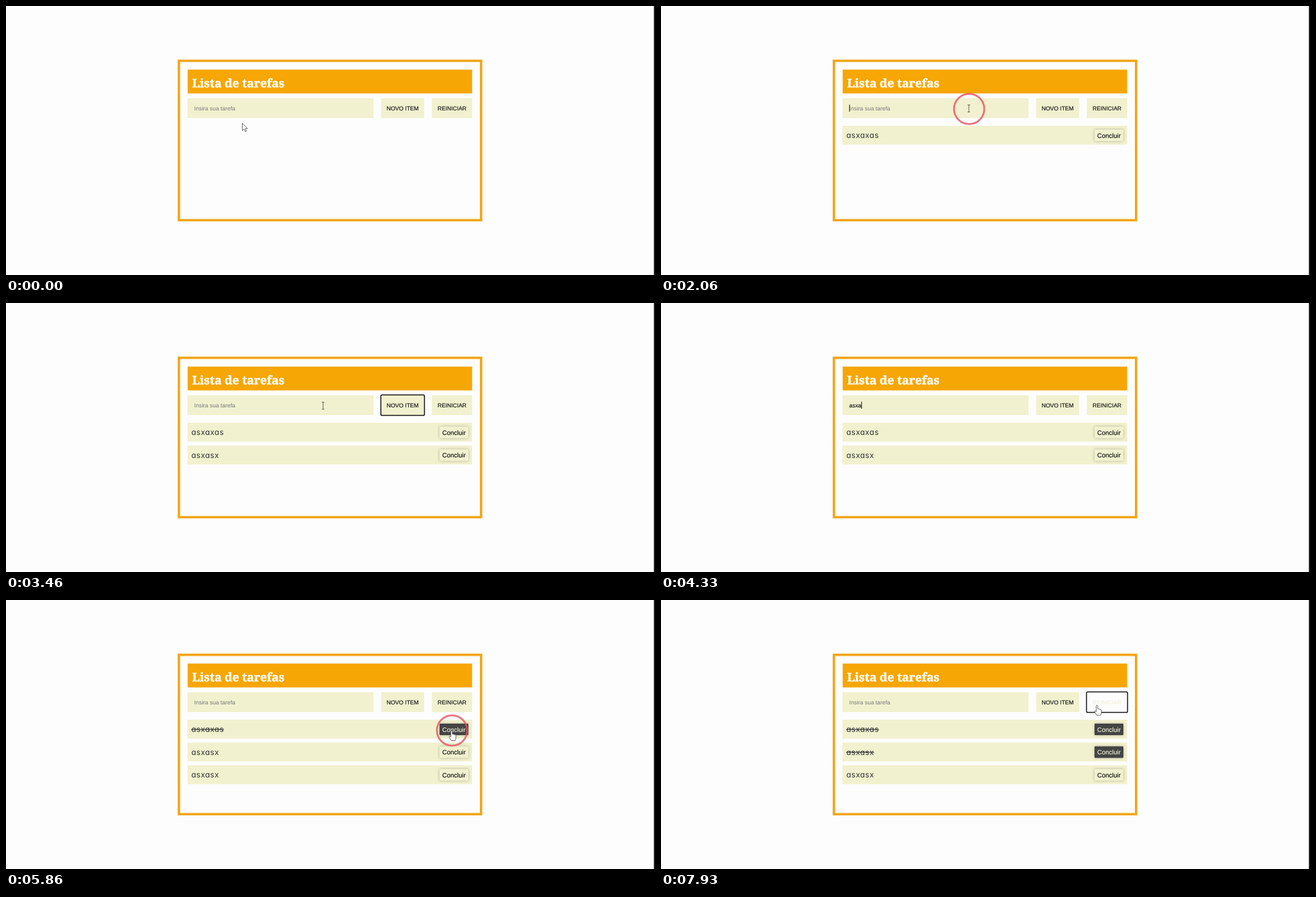
Recreate the animation shown at these times as an HTML page. Size 1012 by 420 pixels, loop 8000 ms.

```html
<!DOCTYPE html>
<html lang="pt">
<head>
<meta charset="utf-8">
<title>Lista de tarefas</title>
<style>
html, body { margin: 0; width: 100%; height: 100%; overflow: hidden; background: #fdfdfd; }
svg { display: block; }
text { font: 8.92px "Liberation Sans", Arial, sans-serif; fill: #111; stroke: #111; stroke-width: .15; text-rendering: geometricPrecision; white-space: pre; }
.title { font: bold 18.4px "Noto Serif", serif; fill: #fffdf5; stroke: #fffdf5; stroke-width: .5; }
.item { font: 12.2px Inter, sans-serif; font-feature-settings: "cv11"; letter-spacing: .4px; fill: #333; stroke: none; }
.done { text-decoration: line-through; }
.small { font-size: 9.95px; }
.hint { fill: #777; stroke: none; }
.pale { fill: #f1efd8; stroke: #f1efd8; }
.shadow { filter: drop-shadow(0 .6px 2px #0004); }
</style>
</head>
<body>
<svg id="stage" width="1012" height="420" viewBox="0 0 1012 420"></svg>
<script>
const LOOP = 8000, MOVE = 270, PRESS = 200, ROW = 35.5;
const CREAM = '#f2f1cf', WHITE = '#fdfdfd', ORANGE = '#f6a605';
const FIELD = [283, 144, 290, 31], ADD = [585, 144, 67, 31], RESET = [664, 144, 63, 31];
const doneBox = i => [676, 193 + ROW * i, 45, 18];

// Places the pointer visits; it presses where there is something to press.
const stop = (at, x, y, on) => ({ at, x, y, on });
const stops = [
  stop(0, 368.5, 183),
  stop(330, 364, 160, 'field'), stop(1330, 593.5, 165, 'add'),
  stop(2060, 480, 160, 'field'), stop(2860, 616.5, 162, 'add'),
  stop(3530, 470, 160, 'field'), stop(4730, 612, 162, 'add'),
  stop(5130, 661.5, 199),
  stop(5730, 695, 203, 'done'), stop(6530, 692.5, 241.5, 'done'),
  stop(7660, 680, 163.5, 'reset')
];
const times = on => stops.filter(s => s.on === on).map(s => s.at);

// Each text is typed between the press on the field and the move to the button.
const tasks = ['asxaxas', 'asxasx', 'asxasx'].map((text, i) => {
  const focus = times('field')[i], press = times('add')[i];
  return { text, focus, press, type: focus + 220, typed: press - MOVE,
    added: press + PRESS, done: times('done')[i] ?? Infinity };
});

const cursors = {
  arrow: 'M0 0V11.6L2.7 9.1 4.6 13.2 6.4 12.4 4.6 8.4H8.2Z',
  hand: 'M-1.3 10V2a1.2 1.2 0 0 1 2.4 0V6.5q1-.6 2 .4 1-.5 1.9 .5 1.6-.3 1.6 1.2V12q0 2-1.2 4.5H-.8q-.8-2.2-2.8-5-.8-1.4 .3-1.9 1-.2 2 1.5Z',
  beam: 'M-2 -5.5H2M0 -5.5V5.5M-2 5.5H2'
};

const stage = document.getElementById('stage');
const ruler = document.createElement('canvas').getContext('2d');
ruler.font = '8.92px "Liberation Sans", Arial, sans-serif';

const rect = ([x, y, w, h], fill, more = '') =>
  `<rect x="${x}" y="${y}" width="${w}" height="${h}" fill="${fill}" ${more}/>`;
const label = (x, y, text, cls = '', more = '') =>
  `<text x="${x}" y="${y}" class="${cls}" ${more}>${text}</text>`;
const inside = ([x, y, w, h], p) => p.x >= x && p.x <= x + w && p.y >= y && p.y <= y + h;

function pointerAt(t) {
  const i = stops.findLastIndex(s => s.at <= t);
  const from = stops[i], to = stops[i + 1] ?? from;
  const leave = Math.max(from.at + (from.on ? PRESS : 0), to.at - MOVE);
  const k = Math.max(0, (t - leave) / (to.at - leave || 1));
  const e = to === from ? 0 : k * k * (3 - 2 * k);
  return { x: from.x + (to.x - from.x) * e, y: from.y + (to.y - from.y) * e };
}

function button(box, text, hover, focus) {
  const [x, y, w, h] = box;
  return rect(box, hover ? WHITE : CREAM) +
    label(x + w / 2, 162.7, text, hover ? 'pale' : '', 'text-anchor="middle"') +
    (focus ? rect([x - .5, y - .5, w + 1, h + 1], 'none', 'rx="1.8" stroke="#111" stroke-width="1.5"') : '');
}

function field(t, focus) {
  const task = tasks.find(k => t >= k.focus && t < k.added);
  const part = task ? (t - task.type) / (task.typed - task.type) : 0;
  const typed = task ? task.text.slice(0, Math.max(0, Math.floor(part * task.text.length))) : '';
  return rect(FIELD, CREAM) +
    label(293.5, 162.7, typed || 'Insira sua tarefa', typed ? '' : 'hint') +
    (focus ? rect([293.5 + ruler.measureText(typed).width, 154, 1, 11], '#111') : '');
}

function row(task, i, t) {
  if (t < task.added) return '';
  const y = ROW * i, done = t >= task.done;
  return rect([283, 187 + y, 444, 29.5], CREAM) +
    label(289, 206.2 + y, task.text, done ? 'item done' : 'item') +
    rect(doneBox(i), done ? '#444' : CREAM, 'rx="1.2" class="shadow"') +
    label(698.5, 205.7 + y, 'Concluir', done ? 'small pale' : 'small', 'text-anchor="middle"');
}

function pointer(t, p) {
  const typing = tasks.some(k => t >= k.type && t < k.typed);
  const overButton = [ADD, RESET].some(b => inside(b, p)) ||
    tasks.some((k, i) => t >= k.added && inside(doneBox(i), p));
  const kind = overButton ? 'hand' : inside(FIELD, p) ? 'beam' : 'arrow';
  const pressed = stops.some(s => s.on && t >= s.at && t < s.at + PRESS);
  return (typing ? '' : `<path d="${cursors[kind]}" transform="translate(${p.x} ${p.y})" fill="#fff" stroke="#444" stroke-width=".8" stroke-linejoin="round"/>`) +
    (pressed ? `<circle cx="${p.x + .5}" cy="${p.y + .7}" r="23.6" fill="none" stroke="#e8505f" stroke-opacity=".8" stroke-width="2.8"/>` : '');
}

function draw(t) {
  const p = pointerAt(t);
  const focus = stops.findLast(s => s.on && s.at <= t)?.on;
  stage.innerHTML = rect([0, 0, 1012, 420], WHITE) + rect([1010.3, 0, 1.7, 420], '#111') +
    rect([269.6, 85.6, 471.2, 248.8], WHITE, 'stroke="#f1a516" stroke-width="3.7"') +
    rect([283.3, 99.3, 443.5, 37.2], ORANGE) + label(290.3, 127, 'Lista de tarefas', 'title') +
    field(t, focus === 'field') +
    button(ADD, 'NOVO ITEM', inside(ADD, p), focus === 'add') +
    button(RESET, 'REINICIAR', inside(RESET, p), focus === 'reset') +
    tasks.map((k, i) => row(k, i, t)).join('') + pointer(t, p);
}

// The picture advances at 60 and 130 ms of every 200 ms.
function snap(t) {
  const rest = t % 200;
  return Math.max(0, t - rest + (rest >= 130 ? 130 : rest >= 60 ? 60 : -70));
}

const start = performance.now();
let shown = -1;
function tick() {
  const t = snap((performance.now() - start) % LOOP);
  if (t !== shown) draw(shown = t);
  requestAnimationFrame(tick);
}
tick();
</script>
</body>
</html>
```
